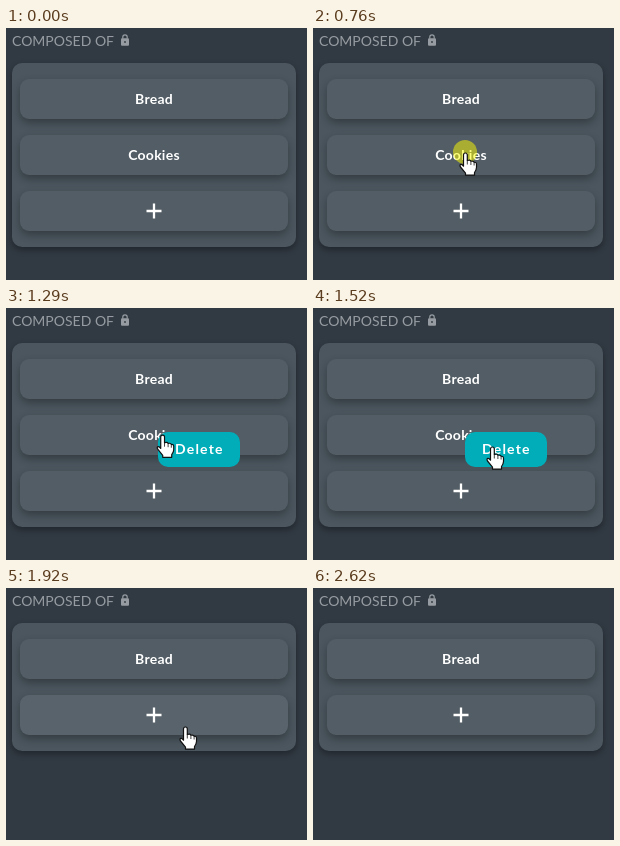
Animation of 301 by 252 pixels, one loop 3.55 s. Source, as an HTML page:

```html
<!DOCTYPE html>
<html lang="en">
<head>
<meta charset="utf-8">
<title>Delete an item</title>
<style>
  html, body { margin: 0; width: 100%; height: 100%; overflow: hidden; background: #313942; }
  body { position: relative; font: 700 14px Lato, sans-serif; color: #fff; }
  body > * { position: absolute; box-sizing: border-box; }
  h1 { left: 6px; top: 3px; margin: 0; font: 400 14px/19px Lato, sans-serif; color: #969ca1; white-space: nowrap; }
  #panel { left: 6px; top: 35px; width: 284px; padding: 16px 8px; border-radius: 10px; background: #4b565e; box-shadow: 0 3px 6px rgba(0, 0, 0, .32); }
  .row { height: 40px; line-height: 40px; text-align: center; letter-spacing: .25px; border-radius: 9px; background: #535d65; box-shadow: 0 4px 8px rgba(0, 0, 0, .3); }
  .row + .row { margin-top: 16px; }
  .row svg { display: block; margin: auto; }
  #add.lit { background: #59636b; }
  #menu { left: 152px; top: 124px; width: 82px; height: 35px; padding-left: 17px; line-height: 33px; letter-spacing: 1.2px; border-radius: 10px; background: #00adb8; }
  #overlay { left: 0; top: 0; }
  [hidden] { display: none; }
</style>
</head>
<body>
<h1>COMPOSED OF</h1>
<div id="panel">
  <div class="row">Bread</div>
  <div class="row" id="item">Cookies</div>
  <div class="row" id="add">
    <svg width="40" height="40"><path d="M12.5 20h15M20 12.5v15" stroke="#fff" stroke-width="2.3"/></svg>
  </div>
</div>
<div id="menu">Delete</div>
<svg id="overlay" width="301" height="252">
  <g fill="#969ca1" transform="translate(0 -.7)">
    <rect x="115" y="11" width="8" height="7.5" rx="1"/>
    <path d="M116.8 11.5V9.8a2.2 2.2 0 0 1 4.4 0v1.7" fill="none" stroke="#969ca1" stroke-width="1.2"/>
    <circle cx="119" cy="14.7" r=".9" fill="#313942"/>
  </g>
  <g id="pointer">
    <circle id="press" r="12" fill="#ff0" fill-opacity=".5"/>
    <g transform="translate(.5 .5)" stroke="#111">
      <path d="M-2 13.7V2.4a1.9 1.9 0 0 1 3.8 0V8q3-1 3.6.8q2.6-.8 3.2 1q2.4-.4 2.4 2V15q0 2-2 5v2.6H0v-2L-5 14.5q-1.2-2 .4-2.6q1.2-.3 2.6 1.8Z"
        fill="#fff" stroke-width="1.2" stroke-linejoin="round"/>
      <path d="M1.8 8v4M5.4 9v3.5M8.6 10v3" stroke-width=".8"/>
    </g>
  </g>
</svg>
<script>
  const LOOP = 3550;
  const STEP = 75; // the pointer advances in discrete steps

  const outside = { x: 220, y: 196 };
  const onItem = { x: 152, y: 124 };
  const onMenu = { x: 179, y: 138 };
  const away = { x: 259, y: 238 };

  const easeOut = p => 1 - (1 - p) ** 4;
  const easeInOut = p => p * p * (3 - 2 * p);
  const easeIn = p => p * p;

  const moves = [
    { start: 150, steps: 4, from: outside, to: onItem, ease: easeOut },
    { start: 1215, steps: 4, from: onItem, to: onMenu, ease: easeInOut },
    { start: 2155, steps: 5, from: onMenu, to: away, ease: easeIn }
  ];

  function pointerAt(t) {
    const { start, steps, from, to, ease } = moves.findLast(move => move.start <= t) ?? moves[0];
    const step = Math.floor((t - start) / STEP);
    const k = ease(Math.max(0, Math.min(1, step / steps)));
    return { x: from.x + (to.x - from.x) * k, y: from.y + (to.y - from.y) * k };
  }

  const find = id => document.getElementById(id);
  const [item, add, menu, pointer, press] = ['item', 'add', 'menu', 'pointer', 'press'].map(find);
  const show = (element, visible) => element.toggleAttribute('hidden', !visible);

  function draw(t) {
    const within = (from, to) => t >= from && t < to;
    show(item, t < 1920);
    show(menu, within(930, 1920));
    add.classList.toggle('lit', within(1920, 2000));
    show(pointer, within(150, 2620));
    show(press, within(760, 930) || within(1850, 1920));
    const { x, y } = pointerAt(t);
    pointer.setAttribute('transform', `translate(${x} ${y})`);
  }

  let start;
  function tick(now) {
    start ??= now;
    draw((now - start) % LOOP);
    requestAnimationFrame(tick);
  }
  draw(0);
  requestAnimationFrame(tick);
</script>
</body>
</html>
```
